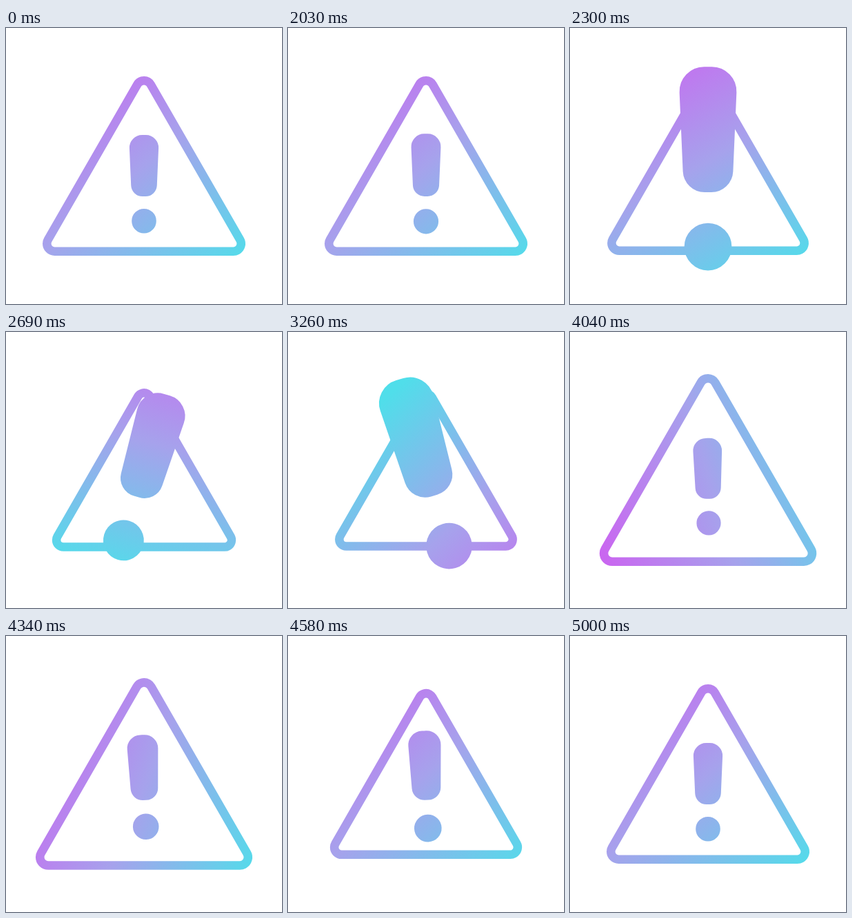
An HTML page with a canvas for the animation above (5030 ms loop, 400 by 400 pixels).

```html
<!DOCTYPE html>
<html lang="en">
<head>
<meta charset="utf-8">
<title>Warning sign</title>
<style>
  html, body { margin: 0; width: 100%; height: 100%; overflow: hidden; background: #fff; }
  canvas { display: block; width: 400px; height: 400px; }
</style>
</head>
<body>
<canvas id="stage" width="400" height="400"></canvas>
<script>
const ctx = document.getElementById('stage').getContext('2d');
const LOOP = 5030, START = 2030, STEP = 30;
const { PI, sin, cos, min, max, floor } = Math;
const RAD = PI / 180;

// Progress from 0 to 1 between two times, plain and eased.
const span = (t, a, b) => min(1, max(0, (t - a) / (b - a)));
const ease = (t, a, b) => sin(span(t, a, b) * PI / 2) ** 2;
const snap = (t, a, b) => {
  const p = span(t, a, b);
  return p < 0.5 ? 4 * p ** 3 : 1 - 4 * (1 - p) ** 3;
};

// The sign shrinks, swells past its size and springs back.
function frameScale(t) {
  return 1 - 0.107 * snap(t, 2080, 2920) + 0.236 * ease(t, 3260, 4415)
           - 0.186 * ease(t, 4190, 4600) + 0.057 * ease(t, 4600, 5000);
}

// The mark pulses twice, then settles with a small bump.
function markScale(t) {
  return 1 + 1.28 * ease(t, 2000, 2390) - 0.78 * ease(t, 2390, 2900)
           + 0.78 * ease(t, 2850, 3500) - 1.30 * ease(t, 3620, 4060)
           + 0.157 * ease(t, 4060, 4580) - 0.137 * ease(t, 4600, 5000);
}

// While large the mark swings once to each side.
function markPose(t) {
  const scale = markScale(t);
  const settle = sin(PI * span(t, 3900, 5000));
  const tilt = 16.6 * sin(2 * PI * span(t, 2400, 3520)) - 2.5 * settle;
  return { scale, tilt, x: 200 - 0.14 * tilt, y: 226 - 20.3 * (scale - 1) - 6 * settle };
}

// One full turn of the colours, with a slight lead and lag.
function hueAngle(t) {
  return 50 + 360 * ease(t, 2000, 4700) + 17 * sin(2 * PI * span(t, 2700, 4580));
}

function gradient(angle) {
  const dx = cos(angle * RAD), dy = sin(angle * RAD);
  const from = -222, mid = -43, to = 160;
  const g = ctx.createLinearGradient(248 + dx * from, 215 + dy * from, 248 + dx * to, 215 + dy * to);
  g.addColorStop(0, 'rgb(201,103,240)');
  g.addColorStop((mid - from) / (to - from), 'rgb(166,162,236)');
  g.addColorStop(1, 'rgb(80,222,234)');
  return g;
}

function trianglePath() {
  const r = 11.2, x = 129.5, y = 112.5;
  ctx.beginPath();
  ctx.arc(0, -y, r, 210 * RAD, 330 * RAD);
  ctx.arc(x, y, r, -30 * RAD, 90 * RAD);
  ctx.arc(-x, y, r, 90 * RAD, 210 * RAD);
  ctx.closePath();
}

function markPath() {
  const top = -68, bottom = 15, wide = 18.8, narrow = 15.2;
  ctx.beginPath();
  ctx.moveTo(0, top);
  ctx.arcTo(wide, top, narrow, bottom, 15.5);
  ctx.arcTo(narrow, bottom, -narrow, bottom, 13.5);
  ctx.arcTo(-narrow, bottom, -wide, top, 13.5);
  ctx.arcTo(-wide, top, 0, top, 15.5);
  ctx.closePath();
  ctx.moveTo(14.8, 53.7);
  ctx.arc(0, 53.7, 14.8, 0, 2 * PI);
}

// Paths scale, line widths do not.
function place(path, { x, y, scale, tilt }) {
  ctx.save();
  ctx.translate(x, y);
  ctx.rotate(tilt * RAD);
  ctx.scale(scale, scale);
  path();
  ctx.restore();
}

function draw(t) {
  ctx.fillStyle = '#fff';
  ctx.fillRect(0, 0, 400, 400);
  ctx.fillStyle = ctx.strokeStyle = gradient(hueAngle(t));
  ctx.lineJoin = 'round';

  place(trianglePath, { x: 200, y: 200, scale: frameScale(t), tilt: 0 });
  ctx.lineWidth = 12.6;
  ctx.stroke();

  place(markPath, markPose(t));
  ctx.lineWidth = 6;
  ctx.fill();
  ctx.stroke();
}

const begin = performance.now();
function tick() {
  const t = (performance.now() - begin) % LOOP;
  draw(t < START ? 0 : START + floor((t - START) / STEP) * STEP);
  requestAnimationFrame(tick);
}
tick();
</script>
</body>
</html>
```
